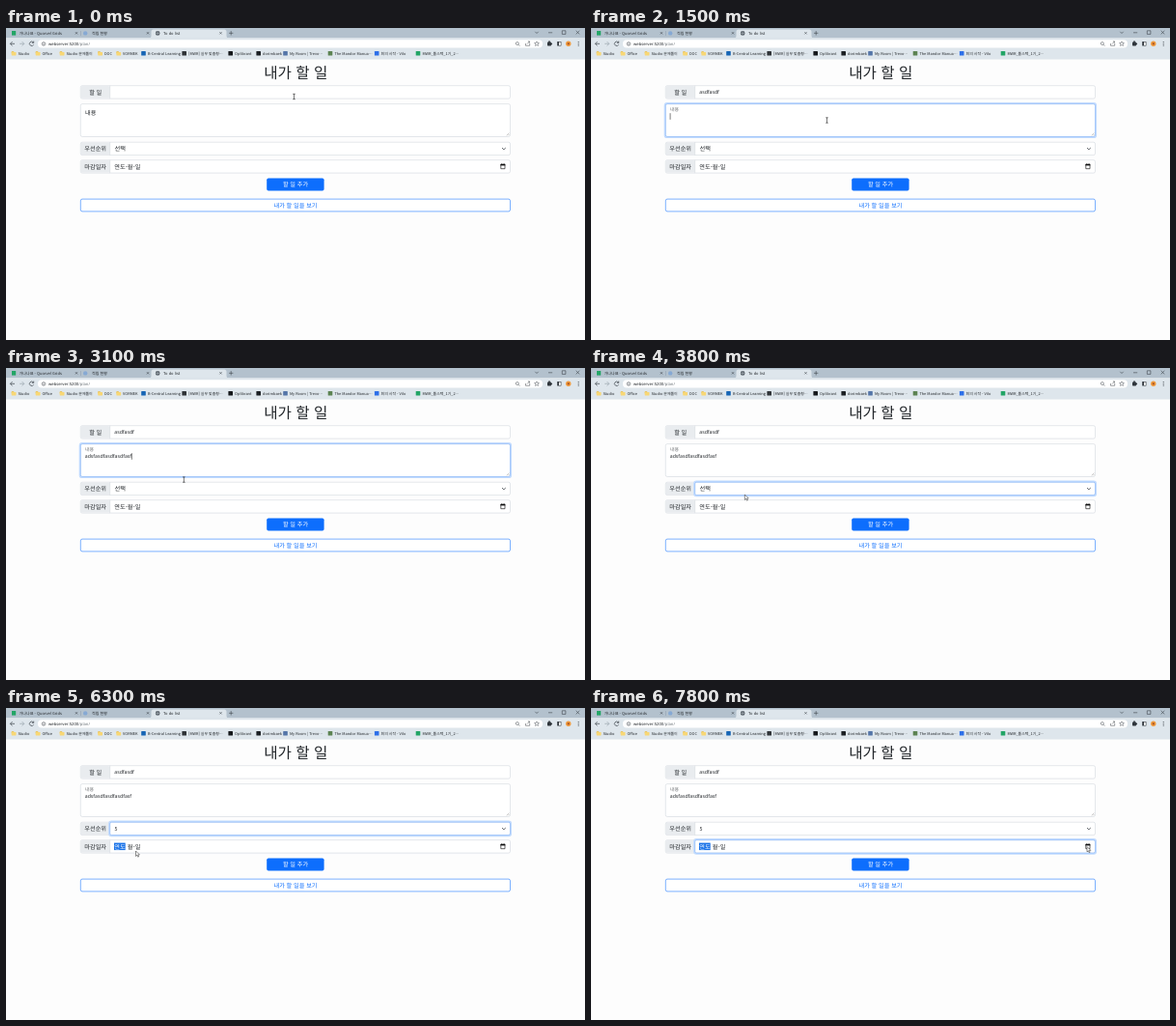
An HTML page for the animation above (8000 ms loop, 600x323 px).

```html
<!DOCTYPE html>
<html lang="ko">
<head>
<meta charset="utf-8">
<title>To do list</title>
<style>
  html, body { margin: 0; width: 100%; height: 100%; overflow: hidden; background: #fdfdfd; }
  svg { display: block; width: 100vw; height: 100vh; }
  text { font-family: 'Noto Sans CJK KR', 'Noto Sans CJK', 'Noto Sans', sans-serif; text-rendering: geometricPrecision; white-space: pre; }
  .latin { font-family: 'Noto Sans', sans-serif; }
</style>
</head>
<body>
<svg id="stage" viewBox="0 0 600 323"></svg>
<script>
const LOOP = 8000;
const INK = '#212529', BLUE = '#0d6efd', EDGE = '#ced4da', CHROME = '#3c4249';

const text = (x, y, str, size = 6.2, fill = INK, extra = '') =>
  `<text x="${x}" y="${y}" font-size="${size}" fill="${fill}" ${extra}>${str}</text>`;
const centred = (x, y, str, size, fill) => text(x, y, str, size, fill, 'text-anchor="middle"');
const rect = (x, y, w, h, fill, r = 0, extra = '') =>
  `<rect x="${x}" y="${y}" width="${w}" height="${h}" rx="${r}" fill="${fill}" ${extra}/>`;
const circle = (x, y, r, fill, extra = '') => `<circle cx="${x}" cy="${y}" r="${r}" fill="${fill}" ${extra}/>`;
const line = (d, stroke = CHROME, width = .6) =>
  `<path d="${d}" fill="none" stroke="${stroke}" stroke-width="${width}"/>`;
const cross = (x, y, r) => line(`M${x - r} ${y - r}l${2 * r} ${2 * r}m0 ${-2 * r}l${-2 * r} ${2 * r}`);
const folder = x => rect(x - 2.3, 24.3, 2.6, 2, '#e8b93c', .4) + rect(x - 2.3, 24.9, 4.8, 3.6, '#f8d775', .4);

function browser() {
  const tabs = rect(0, 0, 600, 10.5, '#b3c1cd')
    + '<path d="M148 10.5q2.5 0 2.5-2.5V4q0-2.5 2.5-2.5H226q2.5 0 2.5 2.5v4q0 2.5 2.5 2.5z" fill="#dee6ec"/>'
    + rect(6, 3, 4.2, 4.6, '#23a566') + text(13.7, 7, '가나나표 - Quorvel Grids', 4)
    + circle(82.2, 5.4, 2.2, '#86a9d4') + text(89, 7, '적립 현황', 4)
    + circle(157.2, 5.4, 2.3, '#4d565e') + line('M155 5.4h4.4M157.2 3.1v4.6', '#dee6ec', .4)
    + text(163, 7, 'To do list', 4)
    + cross(73, 5.3, 1.1) + cross(147, 5.3, 1.1) + cross(222.5, 5.3, 1.1)
    + line('M77.5 3v5', '#8394a2', .4) + line('M231 5.3h4.4M233.2 3.1v4.4')
    + line('M548.3 3.8l1.7 1.7 1.7-1.7M562 4.8h4.2M576.3 2.8h3.6v3.6h-3.6z') + cross(592.5, 4.6, 1.8);

  const toolbar = rect(0, 10.5, 600, 22, '#dee6ec')
    + line('M9 16.3H4.5M6.6 14.1l-2.2 2.2 2.2 2.2', CHROME, .7)
    + line('M14.2 16.3h4.5M16.6 14.1l2.2 2.2-2.2 2.2', '#9aa5ae', .7)
    + line('M28.4 15A2.2 2.2 0 1 0 28.6 17.2M28.7 13.6v1.8h-1.8', CHROME, .7)
    + rect(33, 12.3, 523, 8.2, '#fff', 4.1)
    + circle(39, 16.4, 1.8, 'none', `stroke="${CHROME}" stroke-width=".5"`) + line('M39 15.2v.5m0 .5v1.5')
    + text(44, 18, 'webserver:5200<tspan fill="#6b7278">/plan/</tspan>', 4.2, INK, 'class="latin"')
    + circle(529.8, 16, 1.5, 'none', `stroke="${CHROME}" stroke-width=".5"`) + line('M531 17.2l1.3 1.3')
    + line('M538.5 16v2.3h4.2V16M540.2 16.5l2.3-2.6h-1.6m1.6 0v1.6', CHROME, .5)
    + line('M550 13.8l.7 1.6 1.7.2-1.3 1.1.4 1.7-1.5-.9-1.5.9.4-1.7-1.3-1.1 1.7-.2z', CHROME, .45)
    + rect(561, 14.5, 4, 4, '#30363c', .7) + circle(563, 14.2, .9, '#30363c') + circle(565.2, 16.4, .9, '#30363c')
    + rect(571.2, 14, 4.2, 4.6, '#343a40', .5) + rect(573, 14.6, 1.8, 3.4, '#fff')
    + circle(582.8, 16.3, 2.7, '#ef9a3d') + circle(582.8, 16.3, 1.1, '#a64e20')
    + [14.5, 16.3, 18.1].map(y => circle(593.2, y, .55, CHROME)).join('');

  const folders = [[8, 'Studio'], [33, 'Office'], [58, 'Studio 문제풀이'], [97.5, 'DOC'], [116.7, 'VORMEK']];
  const links = [
    [142.5, '#1765b5', 'B-Central Learning'], [184.7, '#2f3337', '[MWR] 실무 맞춤형…'],
    [232.7, '#15181b', 'Oplibrant'], [261.7, '#1b1f23', 'dorimbaek'],
    [289.5, '#5475a8', 'My Room | Trevo…'], [336, '#5c8352', 'The Mandor Manua…'],
    [384.2, '#2d6fe8', '회의 시작 - Vilo'], [427, '#23a566', 'MWR_풀스택_1기_2…']
  ];
  const label = (x, str) => text(x + 4.4, 28, str, 3.9);
  return tabs + toolbar
    + folders.map(([x, str]) => folder(x) + label(x, str)).join('')
    + links.map(([x, fill, str]) => rect(x - 2.3, 24, 4.6, 4.6, fill, .6) + label(x, str)).join('');
}

const box = (x, y, w, h, fill = '#fff', stroke = EDGE) =>
  rect(x, y, w, h, fill, 1.8, `stroke="${stroke}" stroke-width=".55"`);
const ring = (id, x, y, w, h) => `<g id="${id}">`
  + rect(x - .8, y - .8, w + 1.6, h + 1.6, 'none', 2.4, 'stroke="#c2dbfe" stroke-width="1.6"')
  + rect(x, y, w, h, 'none', 1.8, 'stroke="#86b7fe" stroke-width=".6"') + '</g>';
const row = (y, label) => box(77.3, y, 445.2, 13.4)
  + rect(77.6, y + .3, 30, 12.8, '#e9ecef', 1.5) + line(`M107.7 ${y}v13.4`, EDGE, .55)
  + centred(92.7, y + 8.9, label);

function form() {
  return centred(300.3, 51.6, '내가 할 일', 15.6)
    + row(59.7, '할 일') + box(77.3, 78.6, 445.2, 33.9) + row(118.2, '우선순위') + row(136.7, '마감일자')
    + ring('ringTask', 107.7, 59.7, 414.8, 13.4) + ring('ringBody', 77.3, 78.6, 445.2, 33.9)
    + ring('ringRank', 107.7, 118.2, 414.8, 13.4) + ring('ringDate', 107.7, 136.7, 414.8, 13.4)
    + line('M518.8 111.3l2.6-2.6M520.3 111.3l1.1-1.1', '#777', .4)
    + text(112.3, 68.4, '', 5.15, INK, 'id="task" class="latin"')
    + text(82, 90.2, '내용', 6.2, INK, 'id="hint"')
    + text(81.8, 93.4, '', 5.15, INK, 'id="body" class="latin"')
    + '<path id="caret" stroke="#111" stroke-width=".55"/>'
    + text(112.5, 127.1, '', 6.2, INK, 'id="rank"')
    + line('M514 124l1.9 1.9 1.9-1.9', '#343a40', .75)
    + rect(112, 139.6, 11.7, 7.5, '#1a73e8', 0, 'id="mark"')
    + text(112.3, 145.6, '<tspan id="year">연도</tspan><tspan id="dash">-</tspan>월-일')
    + line('M512.8 141.3h4.2v4.4h-4.2z', '#111', .65) + rect(512.5, 140.9, 4.8, 1.5, '#111')
    + line('M513.7 140.2v1M516.1 140.2v1', '#111', .6)
    + rect(270.2, 155.4, 59.4, 13.1, BLUE, 1.8) + centred(300, 164.2, '할 일 추가', 6.2, '#fff')
    + box(77.3, 177.1, 445.2, 12.8, '#fff', BLUE) + centred(300, 185.7, '내가 할 일을 보기', 6.2, BLUE);
}

const pointer = '<g id="arrow"><path d="M0 0v5.4l1.3-1.1.9 1.9.9-.4-.9-1.9h1.7z" fill="#fff" stroke="#222" stroke-width=".5"/></g>'
  + `<g id="beam">${line('M-1.3-2.7h2.6M0-2.7v5.4M-1.3 2.7h2.6', '#222', .6)}</g>`;

document.getElementById('stage').innerHTML =
  rect(0, 0, 600, 323, '#fdfdfd') + browser() + form() + pointer;

const el = {};
document.querySelectorAll('#stage [id]').forEach(node => el[node.id] = node);

const ramp = (t, start, span = 100) => Math.min(1, Math.max(0, (t - start) / span));
const show = (node, on) => node.setAttribute('opacity', +on);
const typed = (str, t, start) => str.slice(0, Math.max(0, Math.floor((t - start) / 75)));
const setText = (node, str) => { if (node.textContent !== str) node.textContent = str; };

// Time, x, y of the mouse
const path = [
  [0, 298.5, 71], [300, 293, 67], [500, 293, 67], [850, 276, 76.6], [1000, 276, 76.6],
  [1400, 244.5, 95.5], [2500, 244.5, 95.5], [3080, 184.5, 115.5], [3550, 162, 125],
  [4450, 148, 156.8], [5050, 148, 156.8], [5700, 146, 173], [5900, 146, 173],
  [6250, 134.5, 148], [7050, 134.5, 148], [7750, 514, 143.5], [LOOP, 514, 143.5]
];

function mouseAt(t) {
  const i = path.findIndex(p => p[0] > t);
  const [t0, x0, y0] = path[i - 1], [t1, x1, y1] = path[i];
  const k = (t - t0) / (t1 - t0), e = k * k * (3 - 2 * k);
  return [x0 + (x1 - x0) * e, y0 + (y1 - y0) * e];
}

// When each field receives the focus
const focus = { task: 250, body: 1400, rank: 3600, date: 6300 };

function draw(t) {
  const fade = (from, to) => ramp(t, from) - ramp(t, to);
  show(el.ringTask, fade(focus.task, focus.body));
  show(el.ringBody, fade(focus.body, focus.rank));
  show(el.ringRank, fade(focus.rank, focus.date));
  show(el.ringDate, ramp(t, focus.date));

  setText(el.task, typed('asdfasdf', t, 525));
  setText(el.body, typed('adsfasdfasdfasdfasf', t, 1625));
  setText(el.rank, t < 5850 ? '선택' : '5');
  el.rank.setAttribute('font-size', t < 5850 ? 6.2 : 5.3);

  const lift = ramp(t, focus.body);
  el.hint.setAttribute('y', 90.2 - 4 * lift);
  el.hint.setAttribute('font-size', 6.2 - 1.2 * lift);
  el.hint.setAttribute('opacity', 1 - .35 * lift);

  const field = t < focus.body ? el.task : el.body;
  const x = +field.getAttribute('x') + field.getComputedTextLength() + .3;
  el.caret.setAttribute('d', `M${x} ${field.getAttribute('y') - 5.2}v6.6`);
  show(el.caret, t >= focus.task && t < focus.rank);

  const picked = t >= 6250;
  show(el.mark, picked);
  el.year.setAttribute('fill', picked ? '#fff' : INK);
  el.dash.setAttribute('fill-opacity', picked ? 0 : 1);

  const [mx, my] = mouseAt(t);
  const overText = (my > 59.5 && my < 73.5) || (my > 78 && my < 117);
  show(el.beam, overText);
  show(el.arrow, !overText);
  el.beam.setAttribute('transform', `translate(${mx} ${my})`);
  el.arrow.setAttribute('transform', `translate(${mx} ${my})`);
}

const begin = performance.now();
function tick() {
  draw((performance.now() - begin) % LOOP);
  requestAnimationFrame(tick);
}
tick();
</script>
</body>
</html>
```
